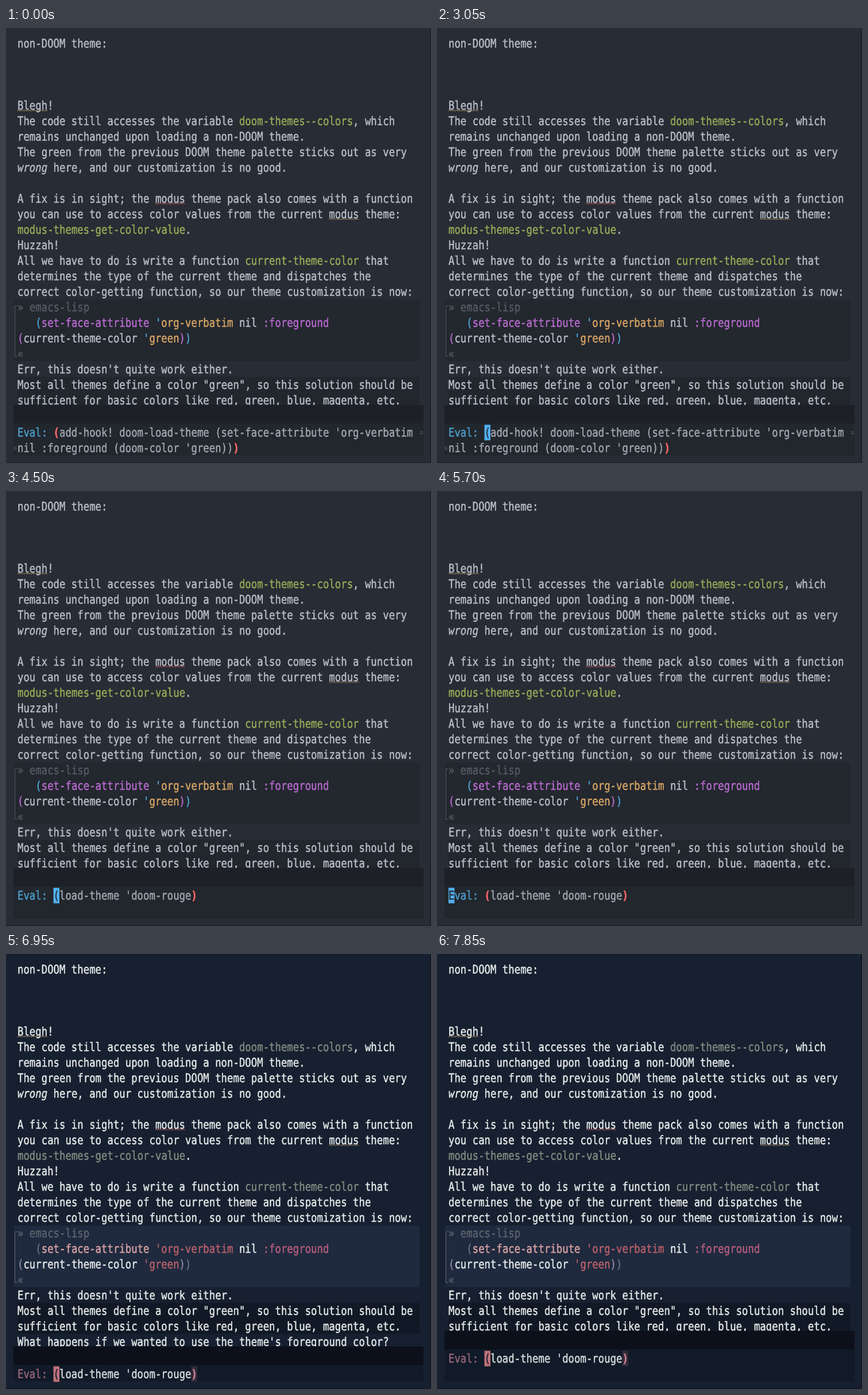
An HTML page for the animation above (8000 ms loop, 740 by 757 pixels).

```html
<!DOCTYPE html>
<html lang="en">
<head>
<meta charset="utf-8">
<title>Theme switch</title>
<style>
  html, body { margin: 0; width: 100%; height: 100%; overflow: hidden; background: #282c34; }
  svg { display: block; width: 100%; height: 100%; }
  text {
    font: 17.33px "DejaVu Sans Mono", monospace; text-rendering: geometricPrecision; white-space: pre;
    color: var(--fg); fill: currentColor; stroke: currentColor; stroke-width: .4px;
  }
  .i { font-style: italic; }
  .g { color: var(--green); }
  .d { color: var(--dim); }
  .p { color: var(--func); }
  .o { color: var(--str); }
  .q { color: var(--quote); }
  .k { color: var(--key); }
  .b { color: var(--paren1); }
  .m { color: var(--paren2); }
  .e { color: var(--mini); }
  .v { color: var(--prompt); }
  .r { color: var(--match); font-weight: bold; }
  .c { color: var(--bg); }
</style>
</head>
<body>
<svg id="stage" viewBox="0 0 740 757"></svg>
<script>
const LOOP = 8000, LEFT = 20, PITCH = 10.43, ROW = 27, TALL = 1.2;
const stage = document.getElementById('stage');

// {x|text} gives the text class x
const BODY = [
  'non-DOOM theme:', '', '', '',
  'Blegh!',
  'The code still accesses the variable {g|doom-themes--colors}, which',
  'remains unchanged upon loading a non-DOOM theme.',
  'The green from the previous DOOM theme palette sticks out as very',
  '{i|wrong} here, and our customization is no good.', '',
  'A fix is in sight; the modus theme pack also comes with a function',
  'you can use to access color values from the current modus theme:',
  '{g|modus-themes-get-color-value}.',
  'Huzzah!',
  'All we have to do is write a function {g|current-theme-color} that',
  'determines the type of the current theme and dispatches the',
  'correct color-getting function, so our theme customization is now:',
  '{d|» emacs-lisp}',
  "   {b|(}{p|set-face-attribute} {q|'}{o|org-verbatim} nil {k|:foreground}",
  "{m|(}current-theme-color {q|'}{o|green}{m|)}{b|)}",
  '{d|«}',
  "Err, this doesn't quite work either.",
  'Most all themes define a color "green", so this solution should be',
  'sufficient for basic colors like red, green, blue, magenta, etc.',
  "What happens if we wanted to use the theme's foreground color?"
];

const EMPTY = ['{v|Eval:}'];
const LOAD = ["{v|Eval:} {r|(}{e|load-theme 'doom-rouge}{r|)}"];
const HOOK = [
  "{v|Eval:} {r|(}{e|add-hook! doom-load-theme (set-face-attribute 'org-verbatim}",
  "{e|nil :foreground (doom-color 'green))}{r|)}"
];

// [start, lines, minibuffer height in rows, cursor [row, column, character]]
const BUFFER = ['body', 3, 't'], OPEN = [0, 6, '('], EVAL = [0, 0, 'E'], BLANK = [0, 6, ''];
const STEPS = [
  [0, HOOK, 2, null],
  [1000, HOOK, 2, [1, 37, '']],
  [2050, HOOK, 2, [1, 0, 'n']],
  [3050, HOOK, 2, OPEN],
  [4100, EMPTY, 1, BLANK],
  [4200, HOOK, 2, OPEN],
  [4350, LOAD, 2, OPEN],
  [5650, LOAD, 2, EVAL],
  [5800, ['{e|t}'], 1, BUFFER],
  [6900, EMPTY, 1, BLANK],
  [6950, LOAD, 1, OPEN],
  [7150, HOOK, 2, OPEN],
  [7300, LOAD, 2, OPEN]
];

const ONE = {
  bg: '#282c34', fg: '#b9bfc9', green: '#94ab58', dim: '#555b63', func: '#b86bcf',
  str: '#d7a566', quote: '#4fa6dd', key: '#b86bcf', paren1: '#4fa6dd', paren2: '#b86bcf',
  mini: '#a3a8b1', prompt: '#4b9fcb', match: '#fb6868', cursor: '#51afef', glow: '#22262d',
  block: '#23272e', line: '#22262d', mode: '#1d2026', echo: '#22262d', edge: '#1b1e24'
};
const ROUGE = {
  bg: '#172030', fg: '#e6ebea', green: '#8b9b77', dim: '#5d636e', func: '#dc9ca6',
  str: '#b96069', quote: '#b96069', key: '#bd6089', paren1: '#4d8fc4', paren2: '#b57ba4',
  mini: '#d8dedf', prompt: '#98657a', match: '#cf8091', cursor: '#b8687a', glow: '#332a3a',
  block: '#1f2a3f', line: '#111926', mode: '#0b101a', echo: '#111a28', edge: '#0d131e'
};
const SETTLED = {
  ...ROUGE, green: '#7f8c80', func: '#dba3a5', key: '#b85d7e',
  paren1: '#62738b', paren2: '#8f879f', cursor: '#bd717a'
};

const xOf = col => LEFT + col * PITCH;
const rect = (x, y, w, h, color) =>
  `<rect x="${x}" y="${y}" width="${w}" height="${h}" fill="var(--${color})"/>`;
const glyphs = (str, col, mid, cls) =>
  `<text class="${cls}" transform="translate(${xOf(col)} ${mid + 7.3}) scale(1 ${TALL})">${str}</text>`;

function line(src, mid) {
  let col = 0, out = '';
  for (const [, cls, marked, plain] of src.matchAll(/\{(\w)\|([^}]*)\}|([^{]+)/g)) {
    const str = marked ?? plain;
    for (const word of str.matchAll(/\S+/g)) out += glyphs(word[0], col + word.index, mid, cls || '');
    col += str.length;
  }
  return out;
}

function squiggle(col, mid, color) {
  let d = `M${xOf(col)} ${mid + 9.5}`;
  for (let i = 0; i < 26; i++) d += `l2 ${i % 2 ? 1.8 : -1.8}`;
  return `<path d="${d}" fill="none" stroke="${color}" stroke-width="1"/>`;
}

const bodyMid = row => 27 + row * ROW;

stage.innerHTML =
  rect(0, 0, 740, 757, 'bg') +
  rect(14, 472.5, 706, 107, 'block') +
  rect(20, 607, 700, 54, 'line') +
  '<path d="M20 483.5H15.5V571.5H20" fill="none" stroke="var(--dim)" stroke-width="1"/>' +
  BODY.map((src, i) => line(src, bodyMid(i))).join('') +
  squiggle(0, bodyMid(4), '#b59a67') +
  squiggle(23, bodyMid(10), '#d25b60') +
  squiggle(52, bodyMid(11), '#b59a67') +
  '<g id="mini"></g>' +
  rect(738.6, 0, 1.4, 757, 'edge') + rect(0, 756, 740, 1, 'edge');
const mini = document.getElementById('mini');

const wrapMark = (x, y, dir) =>
  `<path transform="translate(${x} ${y}) scale(${dir} 1)" d="M-2 -2H2V2H-2M0 0L-2 2L0 4" fill="none" stroke="var(--dim)" stroke-width="1"/>`;

function drawMini([, lines, rows, cursor]) {
  const top = 717.5 - (rows - 1) * ROW;
  const mid = row => top + 13.5 + row * ROW;
  let out = rect(13, top - 34.5, 714, 32, 'mode') + rect(13, top - 2.5, 714, 744 - top + 2.5, 'echo');
  if (lines === LOAD && cursor === OPEN) out += rect(xOf(29), top, PITCH, ROW, 'glow');
  lines.forEach((src, i) => { out += line(src, mid(i)); });
  if (lines.length > 1) out += wrapMark(723, mid(0), 1) + wrapMark(16, mid(1), -1);
  if (cursor) {
    const [row, col, ch] = cursor;
    const y = row === 'body' ? bodyMid(22) : mid(row);
    out += rect(xOf(col), y - 13.5, PITCH, ROW, 'cursor') + glyphs(ch, col, y, 'c');
  }
  mini.innerHTML = out;
}

const channels = hex => [1, 3, 5].map(i => parseInt(hex.slice(i, i + 2), 16));
function mix(a, b, k) {
  const to = channels(b);
  return `rgb(${channels(a).map((v, i) => Math.round(v + (to[i] - v) * k))})`;
}

let shownStep, shownTheme;
function render(t) {
  const step = STEPS.findLast(s => s[0] <= t);
  if (step !== shownStep) drawMini(shownStep = step);

  // the new colours settle in small steps
  const settle = Math.min(1, Math.max(0, Math.floor((t - 6200) / 50) / 8));
  const theme = t < 5800 ? -1 : settle;
  if (theme === shownTheme) return;
  shownTheme = theme;
  for (const name in ONE) {
    const color = theme < 0 ? ONE[name] : mix(ROUGE[name], SETTLED[name], settle);
    stage.style.setProperty('--' + name, color);
  }
}

const start = performance.now();
function tick() {
  render((performance.now() - start) % LOOP);
  requestAnimationFrame(tick);
}
tick();
</script>
</body>
</html>
```
